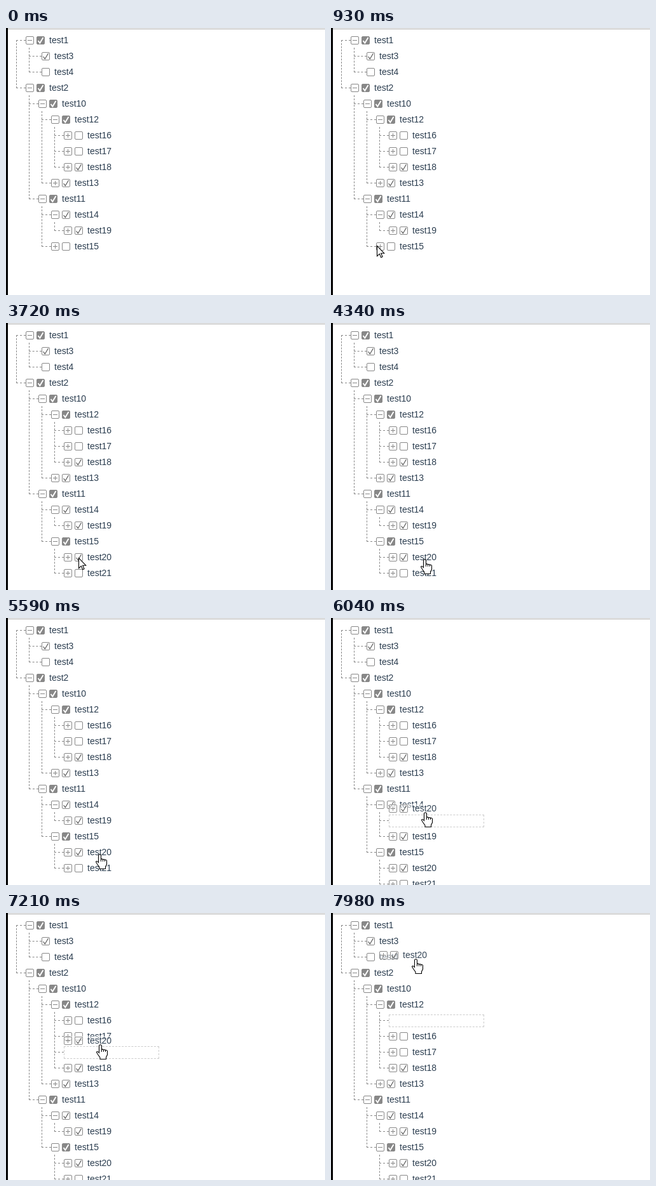
These frames come from a looping animation (502 px wide and 421 px high, 8000 ms). An HTML page with a canvas:

```html
<!DOCTYPE html>
<html lang="en">
<head>
<meta charset="utf-8">
<title>Draggable tree</title>
<style>
  html, body { margin: 0; width: 100%; height: 100%; overflow: hidden; background: #fff; }
  canvas { display: block; }
</style>
</head>
<body>
<canvas id="stage" width="502" height="421"></canvas>
<script>
const ctx = document.getElementById('stage').getContext('2d', { alpha: false });
const LOOP = 8000, STEP = 75, ROW = 25, TOP = 19, GRAY = '#888', INK = '#2c3e50';
const ENTER = 140, EXPAND = 1240, CHECK = 3720, DRAG = 5590;
const FIRST_SLOT = 6;

const move = (start, end, x, y) => ({ start, end, x, y });
const home = { x: 217, y: 405 };
const moves = [
  move(ENTER, 470, 60, 343),      // to the toggle
  move(740, 930, 72, 343),
  move(1480, 1715, 105, 402),     // round to the label
  move(1715, 1940, 137, 376),
  move(1940, 2260, 143, 373),
  move(2490, 2640, 114, 370),     // to the checkbox
  move(CHECK, 4030, 185, 381),    // away and back
  move(4030, 4340, 147, 372),
  move(DRAG, 6430, 148, 249),     // drag upwards
  move(6430, 6990, 148, 207),
  move(7210, 7750, 136, 65),
  move(7750, 7980, 133, 72)
];

const node = (name, mark, kids = [], leaf = false) =>
  ({ name, mark, kids, leaf, open: kids.length > 0 });
const leaf = (name, mark) => node(name, mark, [], true);

function buildTree(t) {
  const picked = t >= CHECK;
  const late = [node('test20', picked ? 'on' : ''), node('test21', '')];
  return [
    node('test1', 'part', [leaf('test3', 'on'), leaf('test4', '')]),
    node('test2', 'part', [
      node('test10', 'part', [
        node('test12', 'part', [node('test16', ''), node('test17', ''), node('test18', 'on')]),
        node('test13', 'on')
      ]),
      node('test11', 'part', [
        node('test14', 'on', [node('test19', 'on')]),
        node('test15', picked ? 'part' : '', t >= EXPAND ? late : [])
      ])
    ])
  ];
}

// Visible rows in order, each with the list that holds it
const flatten = list => list.flatMap(n => [{ n, list }, ...flatten(n.kids)]);

// The slot goes below the row above the pointer: first child if open, else next sibling
function insertSlot(tree, y) {
  const row = Math.max(FIRST_SLOT, Math.floor((y + 17) / ROW));
  const { n, list } = flatten(tree)[row - 1];
  const slot = { slot: true, kids: [] };
  if (n.open) n.kids.unshift(slot);
  else list.splice(list.indexOf(n) + 1, 0, slot);
}

// The pointer advances in steps, as a low frame rate shows it
function pointerAt(t) {
  let from = home;
  for (const m of moves) {
    if (t < m.start) break;
    if (t < m.end) {
      const f = Math.floor((t - m.start) / STEP) * STEP / (m.end - m.start);
      const mix = (a, b) => Math.round(a + (b - a) * f);
      return { x: mix(from.x, m.x), y: mix(from.y, m.y) };
    }
    from = m;
  }
  return from;
}

function line(points, color, width = 1) {
  ctx.strokeStyle = color;
  ctx.lineWidth = width;
  ctx.beginPath();
  points.forEach(p => ctx.lineTo(...p));
  ctx.stroke();
}

// Gaps are fitted so that a dash stands at both ends
function dashed(x0, y0, x1, y1, color = GRAY) {
  const length = Math.hypot(x1 - x0, y1 - y0);
  const count = Math.max(2, Math.round((length + 2) / 5));
  ctx.setLineDash([3, (length - 3 * count) / (count - 1)]);
  line([[x0, y0], [x1, y1]], color);
  ctx.setLineDash([]);
}

function box(cx, cy, filled) {
  ctx.beginPath();
  ctx.roundRect(cx - 5.5, cy - 5.5, 12, 12, 1.5);
  ctx.lineWidth = 1;
  ctx.strokeStyle = ctx.fillStyle = GRAY;
  if (filled) ctx.fill();
  ctx.stroke();
}

function toggle(cx, cy, open) {
  box(cx, cy);
  ctx.fillRect(cx - 3, cy, 7, 1);
  if (!open) ctx.fillRect(cx, cy - 3, 1, 7);
}

function checkbox(cx, cy, mark) {
  const part = mark === 'part';
  box(cx, cy, part);
  if (!mark) return;
  line([[cx - 3.5, cy + 1], [cx - 0.7, cy + 4.7], [cx + 4.5, cy - 4]],
    part ? '#fff' : '#555', part ? 1.9 : 1.2);
}

function drawItem(n, cx, cy) {
  if (!n.leaf) toggle(cx, cy, n.open);
  const boxX = cx + (n.leaf ? 5 : 17);
  checkbox(boxX, cy, n.mark);
  ctx.fillStyle = INK;
  ctx.fillText(n.name, boxX + 14, cy + 5);
}

function drawSlot(x, cy) {
  const left = x + 0.5, right = x + 149.5, top = cy - 8.5, bottom = cy + 10.5;
  for (const y of [top, bottom]) dashed(x, y, x + 150, y, '#ccc');
  for (const sx of [left, right]) dashed(sx, top, sx, bottom, '#ccc');
}

// Draws a list of siblings and returns the y of the next free row
function drawList(list, depth, y, top) {
  const x = 16 + depth * 20;
  let last = y;
  for (const n of list) {
    last = y;
    dashed(x, y + 0.5, x + (n.leaf ? 20 : 15), y + 0.5);
    if (n.slot) drawSlot(x + 15, y);
    else drawItem(n, x + 21, y);
    y += ROW;
    if (n.open) y = drawList(n.kids, depth + 1, y, last + 12);
  }
  dashed(x + 0.5, top, x + 0.5, last + 1);
  return y;
}

function drawGhost(x, y) {
  ctx.fillStyle = 'rgba(255, 255, 255, 0.5)';
  ctx.fillRect(x - 6, y - 7, 76, 15);
  ctx.globalAlpha = 0.95;
  drawItem(node('test20', 'on'), x, y);
  ctx.globalAlpha = 1;
}

function drawCursor(shape, x, y) {
  ctx.save();
  ctx.translate(x + 0.5, y + 0.5);
  ctx.beginPath();
  shape();
  ctx.closePath();
  ctx.fillStyle = '#fff';
  ctx.fill();
  ctx.strokeStyle = '#000';
  ctx.lineWidth = 1.1;
  ctx.stroke();
  if (shape === hand) for (const fx of [2, 5, 8]) line([[fx, 8], [fx, 11.5]], '#000');
  ctx.restore();
}

function arrow() {
  [[0, 0], [0, 16.2], [3.8, 12.6], [6.2, 18.2], [8.6, 17.2], [6.2, 11.7], [11.2, 11.7]]
    .forEach(p => ctx.lineTo(...p));
}

function hand() {
  ctx.moveTo(-2, 1.5);
  ctx.quadraticCurveTo(0, -1, 2, 1.5);
  ctx.lineTo(2, 8);
  for (const fx of [2, 5, 8]) ctx.quadraticCurveTo(fx + 1.5, 6 + fx / 4, fx + 3, 8 + fx / 4);
  [[11, 16], [9, 20], [9, 23], [-0.5, 23], [-0.5, 20.5], [-4, 15.5], [-6, 12]]
    .forEach(p => ctx.lineTo(...p));
  ctx.quadraticCurveTo(-5, 9.5, -2, 13);
}

function draw(t) {
  ctx.fillStyle = '#fff';
  ctx.fillRect(0, 0, 502, 421);
  ctx.fillStyle = '#aaa';
  ctx.fillRect(0, 1, 502, 1);
  ctx.fillStyle = '#000';
  ctx.fillRect(0, 0, 3, 421);
  ctx.font = '14px "Liberation Sans", Arial, sans-serif';

  const tree = buildTree(t);
  const { x, y } = pointerAt(t);
  const dragging = t >= DRAG + STEP;
  if (dragging) insertSlot(tree, y);
  drawList(tree, 0, TOP, TOP);
  if (t < ENTER) return;

  if (dragging) drawGhost(x - 51, y - 6);
  const overLabel = t > EXPAND && x > 126 && x < 168;
  drawCursor(dragging || overLabel ? hand : arrow, x, y);
}

const begin = performance.now();
function tick() {
  draw((performance.now() - begin) % LOOP);
  requestAnimationFrame(tick);
}
tick();
</script>
</body>
</html>
```
